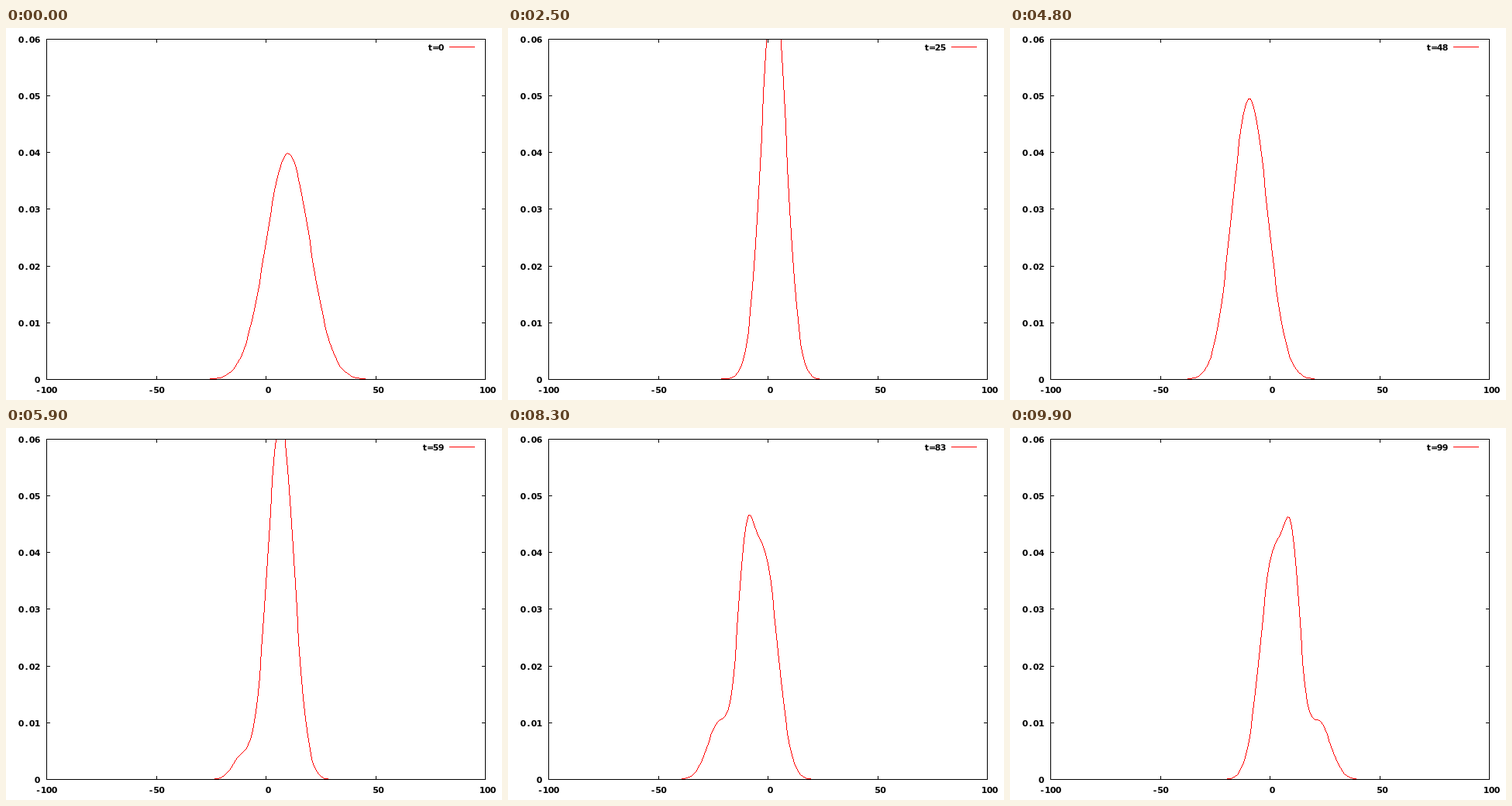
An HTML page with a canvas for the animation above (10000 ms loop, 640 by 480 pixels).

```html
<!DOCTYPE html>
<html lang="en">
<head>
<meta charset="utf-8">
<title>Oscillating wave packet</title>
<style>
html, body { margin: 0; width: 100%; height: 100%; overflow: hidden; background: #fff; }
canvas { display: block; }
</style>
</head>
<body>
<canvas id="plot" width="640" height="480"></canvas>
<script>
const ctx = document.getElementById('plot').getContext('2d');
const LEFT = 52, RIGHT = 618, TOP = 14, BOTTOM = 453;
const PERIOD = 31.8, STEP = 100, COUNT = 100, CELL = 7;
const DEG = Math.PI / 180;

const px = x => Math.round(LEFT + (x + 100) / 200 * (RIGHT - LEFT));
const py = y => Math.floor(BOTTOM + 0.49 - y / 0.06 * (BOTTOM - TOP));
const mix = (a, b, k) => a + (b - a) * k;

// The packet swings and breathes in a soft well; its outer part falls behind.
function packet(t) {
  const phase = t / PERIOD * 360;
  const cos = a => Math.cos(a * DEG);
  const u = Math.min(1, t / 59), v = u ** 2.5;
  const whole = 64 + 36 * cos(2 * phase);
  const turn = 2 * (phase - 40);
  const tail = v * (0.09 - 0.05 * cos(2 * (phase + 50)));
  const part = (weight, radius, lag, variance) => ({
    weight,
    mean: radius * cos(phase - lag),
    sd: Math.sqrt(variance)
  });
  return [
    part((1 - tail) * 2 / 3, mix(10, 7.6, v), -39 * v,
      mix(whole, 35 - 8 * Math.sin(turn * DEG), v)),
    part((1 - tail) / 3, mix(10, 11.7, v), 12 * v,
      mix(whole, 25 - 11 * cos(turn), v)),
    part(tail, mix(12, 24.4, u), 65.5 * u,
      24 + 6.2 * cos(turn) + 120 * (1 - u))
  ];
}

function density(parts, x) {
  return parts.reduce((sum, { weight, mean, sd }) => {
    const z = (x - mean) / sd;
    return sum + weight * Math.exp(-z * z / 2) / (sd * Math.sqrt(2 * Math.PI));
  }, 0);
}

// One-pixel line without smoothing
function line(x0, y0, x1, y1) {
  const n = Math.max(Math.abs(x1 - x0), Math.abs(y1 - y0), 1);
  for (let i = 0; i <= n; i++) {
    const x = Math.round(mix(x0, x1, i / n));
    const y = Math.round(mix(y0, y1, i / n));
    if (y >= TOP && y <= BOTTOM) ctx.fillRect(x, y, 1, 1);
  }
}

// Fixed-pitch label, one character per cell
function label(text, x, base) {
  [...text].forEach((c, i) => ctx.fillText(c, x + (i + 0.5) * CELL, base));
}

function drawAxes() {
  ctx.fillStyle = '#000';
  line(LEFT, TOP, RIGHT, TOP);
  line(LEFT, BOTTOM, RIGHT, BOTTOM);
  line(LEFT, TOP, LEFT, BOTTOM);
  line(RIGHT, TOP, RIGHT, BOTTOM);
  for (let i = 0; i <= 6; i++) {
    const y = py(i / 100), text = i ? '0.0' + i : '0';
    line(LEFT, y, LEFT + 4, y);
    line(RIGHT - 4, y, RIGHT, y);
    label(text, 44 - text.length * CELL, y + 5);
  }
  for (let v = -100; v <= 100; v += 50) {
    const x = px(v), text = (v < 0 ? '' : ' ') + v;
    line(x, TOP, x, TOP + 4);
    line(x, BOTTOM - 4, x, BOTTOM);
    label(text, x - text.length * CELL / 2, 471);
  }
}

function draw(t) {
  ctx.fillStyle = '#fff';
  ctx.fillRect(0, 0, 640, 480);
  ctx.font = 'bold 11px "DejaVu Sans", Verdana, sans-serif';
  ctx.textAlign = 'center';

  ctx.fillStyle = '#f00';
  const parts = packet(t);
  let lastX = px(-100), lastY = py(density(parts, -100));
  for (let v = -99; v <= 100; v++) {
    const x = px(v), y = py(density(parts, v));
    line(lastX, lastY, x, y);
    lastX = x;
    lastY = y;
  }
  line(572, 24, 604, 24);

  drawAxes();
  const title = 't=' + t;
  label(title, 565 - title.length * CELL, 29);
}

let shown = -1;
const start = performance.now();
function tick(now) {
  const t = Math.floor(Math.max(0, now - start) / STEP) % COUNT;
  if (t !== shown) draw(shown = t);
  requestAnimationFrame(tick);
}
draw(shown = 0);
requestAnimationFrame(tick);
</script>
</body>
</html>
```
